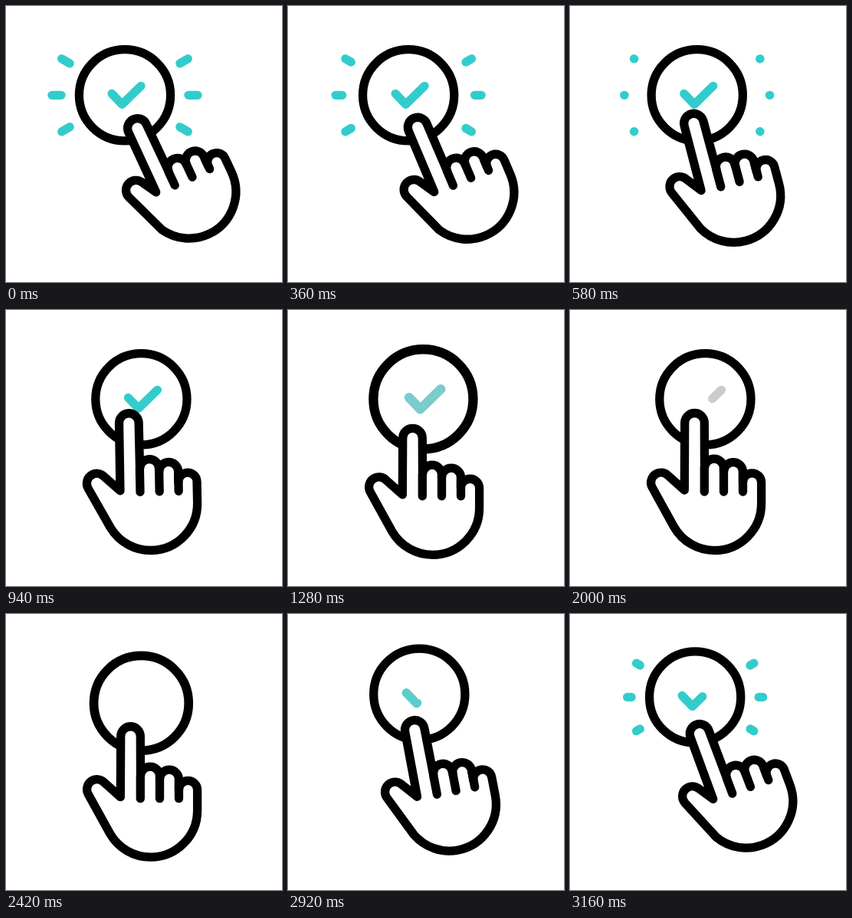
Animation of 360 by 360 pixels, one loop 3180 ms. Source, as an HTML page with a canvas:

```html
<!DOCTYPE html>
<html lang="en">
<head>
<meta charset="utf-8">
<title>Tap to confirm</title>
<style>
html, body { margin: 0; width: 100%; height: 100%; overflow: hidden; background: #fff; }
canvas { display: block; width: 360px; height: 360px; }
</style>
</head>
<body>
<canvas width="360" height="360"></canvas>
<script>
const ctx = document.querySelector('canvas').getContext('2d');
const LOOP = 3180, TAP = 540, FIRST_TAP = 940, LAST_TAP = 2560;
const { PI, cos, sin, atan2, acos, hypot } = Math;

const ramp = (t, a, b) => Math.min(1, Math.max(0, (t - a) / (b - a)));
const ease = (t, a, b) => { const u = ramp(t, a, b); return u * u * (3 - 2 * u); };
const mix = (a, b, u) => a + (b - a) * u;

function strokeLine(points, color) {
  ctx.beginPath();
  points.forEach(([x, y]) => ctx.lineTo(x, y));
  ctx.strokeStyle = color;
  ctx.stroke();
}

// Part of a polyline between two fractions of its length
function trim(points, from, to) {
  const lengths = points.slice(1).map(([x, y], i) => hypot(x - points[i][0], y - points[i][1]));
  const total = lengths.reduce((a, b) => a + b);
  const out = [];
  let start = 0;
  lengths.forEach((len, i) => {
    const a = Math.max(0, (from * total - start) / len);
    const b = Math.min(1, (to * total - start) / len);
    if (a < b) for (const u of [a, b]) {
      out.push([mix(points[i][0], points[i + 1][0], u), mix(points[i][1], points[i + 1][1], u)]);
    }
    start += len;
  });
  return out;
}

function drawRays(from, to) {
  if (to <= from) return;
  for (const deg of [-30, 0, 30, 150, 180, 210]) {
    const a = deg * PI / 180;
    strokeLine([from, to].map(u => mix(83, 95, u)).map(r => [r * cos(a), r * sin(a)]), '#33cccc');
  }
}

function drawButton(t, tapPhase) {
  const x = mix(155, 176.4, ease(t, 220, 940) - ease(t, 2630, 3546));
  const hop = ease(t, 2680, 3030) - ease(t, 3030, 3300);
  const offset = (tapPhase - 0.547) / 0.327;
  const pulse = Math.abs(offset) < 1 ? cos(offset * PI / 2) ** 2 : 0;

  ctx.save();
  ctx.translate(x, 116.3 - 15 * hop);
  if (t < 1000) drawRays(ease(t, 220, 620), 1);
  else drawRays(0, ramp(t, 2960, 3400));

  ctx.scale(1 + 0.108 * pulse, 1 + 0.108 * pulse);
  ctx.beginPath();
  ctx.arc(0, 0, 59.6, 0, 2 * PI);
  ctx.strokeStyle = '#000';
  ctx.stroke();

  const grey = ramp(t, 1100, 1480) - ramp(t, 2635, 3025);
  const color = `rgb(${mix(51, 205, grey)}, 204, 204)`;
  const check = [[-17, -2], [-3.5, 12], [21, -12]];
  const part = t < 2400 ? trim(check, ramp(t, 1480, 2230), 1) : trim(check, 0, ramp(t, 2635, 3385));
  if (part.length) strokeLine(part, color);
  ctx.restore();
}

// Angle at which a line from a point touches a circle
function tangent([px, py], [cx, cy], r, side) {
  const dx = px - cx, dy = py - cy;
  return atan2(dy, dx) + side * acos(r / hypot(dx, dy));
}

function drawHand(t, press) {
  const back = ease(t, 2520, 3400);
  const upright = ease(t, 220, 1050) - back;
  const shift = ease(t, 220, 940) - back;
  const reach = ease(t, 220, 940) - ease(t, 2540, 2800);
  const knuckle = 8 * (1 - upright) + press;
  const valley = [-39.3, -17.5], side = [-52.8, 30.5];
  const thumb = [mix(-62, -70, upright), mix(-31, -27.5, upright)];

  ctx.save();
  ctx.translate(mix(238.8, 188.6, shift), mix(242.2, 252.5, shift) + 3.5 * press);
  ctx.rotate(-25 * (1 - upright) * PI / 180);
  ctx.strokeStyle = '#000';
  ctx.fillStyle = '#fff';

  ctx.beginPath();
  ctx.moveTo(...valley);
  ctx.arc(-26.1, -103.5 - 2 * reach + 8.5 * press, 12.8, PI, 0);
  ctx.arc(-0.6, -46 + knuckle * 1.4, 12.5, PI, 0);
  ctx.arc(24.4, -41.5 + knuckle, 12.5, PI, 0);
  ctx.arc(48.9, -27.7 + knuckle, 12.1, PI, 0);
  ctx.arc(0, 0, 61, 0, PI * 5 / 6);
  ctx.arc(...thumb, 13, tangent(side, thumb, 13, 1), tangent(valley, thumb, 13, -1));
  ctx.closePath();
  ctx.fill();
  ctx.stroke();

  [[-13.3, -46], [11.9, -46], [36.9, -41.5]].forEach(([x, y]) =>
    strokeLine([[x, y + knuckle * 1.4], [x, -15.5]], '#000'));
  ctx.restore();
}

function frame(now) {
  const t = now % LOOP;
  const tapping = t > FIRST_TAP && t < LAST_TAP;
  const tapPhase = tapping ? (t - FIRST_TAP) / TAP % 1 : 0;
  ctx.clearRect(0, 0, 360, 360);
  ctx.lineWidth = 11.3;
  ctx.lineCap = ctx.lineJoin = 'round';
  drawButton(t, tapPhase);
  drawHand(t, 1 - cos(2 * PI * tapPhase));
  requestAnimationFrame(frame);
}
requestAnimationFrame(frame);
</script>
</body>
</html>
```
